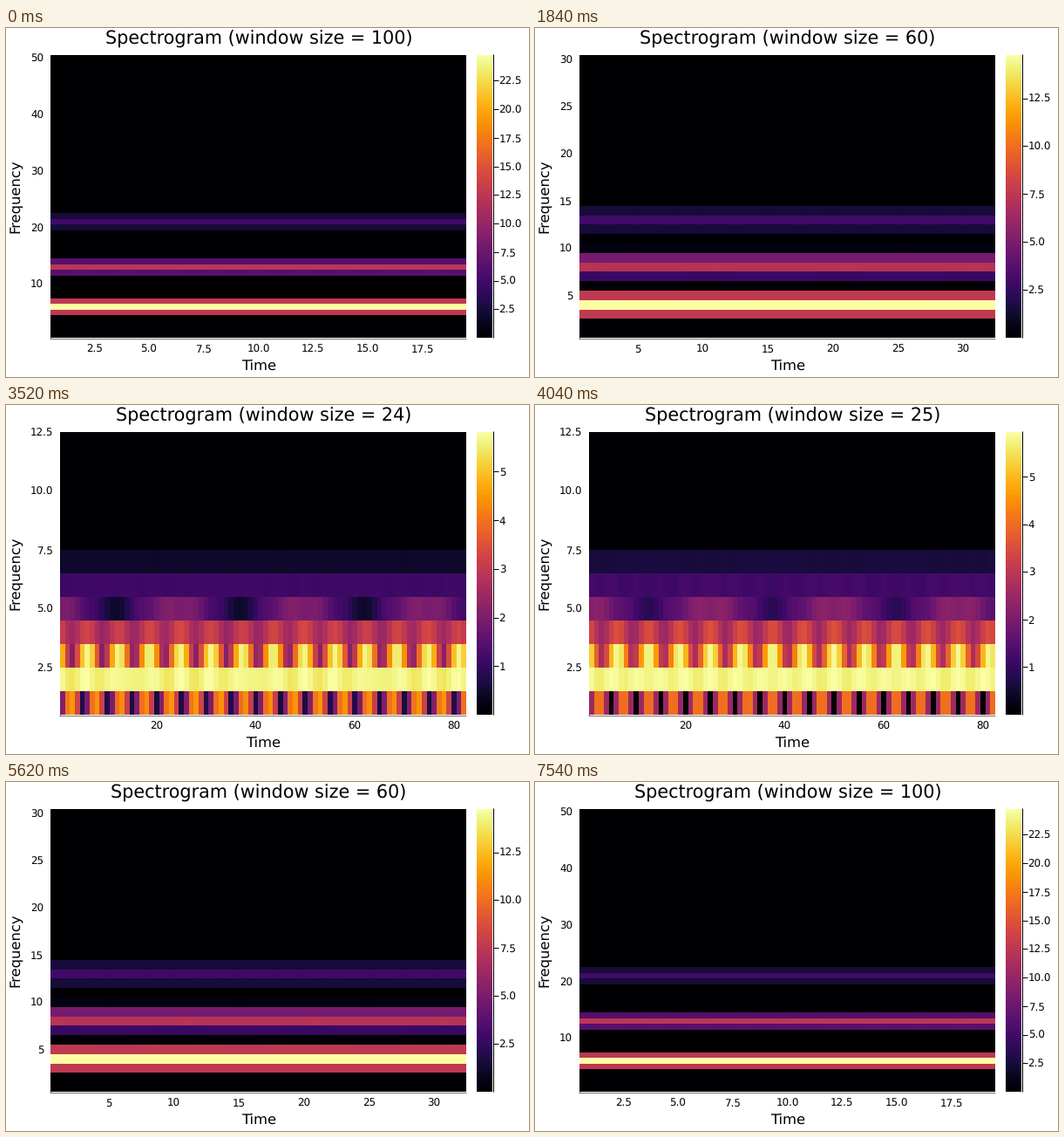
Write a matplotlib script that moves like this. It is 600 px wide and 400 px high and loops after 7640 ms.

```python
import numpy as np
import matplotlib.pyplot as plt
from matplotlib.animation import FuncAnimation
from matplotlib.collections import LineCollection

plt.rcParams["font.family"] = "DejaVu Sans"
plt.rcParams["text.hinting"] = "none"

W, H, DPI = 600, 400, 100
TOP, BOTTOM, RIGHT = 31, 355, 528
BAR_L, BAR_R = 540, 558
TICK_MS = 20
SCALE = 1.07            # text size factor
DIGIT_DROP = 4.7        # from tick position down to the label's baseline

# Signal: three sines sampled at 100 Hz for ten seconds
t = np.arange(1001) / 100
signal = sum(a * np.sin(2 * np.pi * f * t) for a, f in ((1, 5), (0.5, 12), (0.2, 20)))


def spectrogram(size):
    hop = size // 2
    starts = np.arange(0, len(signal) - size + 1, hop)
    parts = signal[starts[:, None] + np.arange(size)] * np.hanning(size)
    return np.abs(np.fft.fft(parts, axis=1))[:, :hop].T


def axis_step(count):
    """Best tick step for an axis from 0.5 to count + 0.5."""
    best = (-1, 0)
    for power in (1, 10):
        for q, nice in ((1, 1), (5, 0.9), (2, 0.7), (2.5, 0.5), (3, 0.2)):
            step = q * power
            n = int((count + 0.5) // step)
            if 4 <= n <= 8:
                score = -abs(n - 5) / 20 + 0.5 * count / ((n - 1) * step) + nice / 4
                best = max(best, (round(score, 9), step))
    return best[1]


def bar_step(span):
    power = 10.0 ** np.floor(np.log10(span))
    factor = span / power
    unit = 2 if factor > 5 else 1 if factor > 2.5 else 0.5 if factor > 1 else 0.2
    return unit * power / 2


def tick_values(step, lo, hi):
    first = int(np.ceil(lo / step))
    return [i * step for i in range(first, int(hi / step + 1e-9) + 1)]


def fmt(value, step):
    return f"{value:.1f}" if step % 1 else f"{value:.0f}"


# Window sizes go down and back up; every third picture is held longer
sizes = list(range(100, 19, -1)) + list(range(20, 101))
schedule = []
for i, size in enumerate(sizes):
    held = i % 3 == 1 or i == len(sizes) - 1
    schedule += [size] * (5 if held else 1)
spectra = {size: spectrogram(size) for size in set(sizes)}

fig = plt.figure(figsize=(W / DPI, H / DPI), dpi=DPI, facecolor="white")
ax = fig.add_axes([0, 0, 1, 1])
ax.axis("off")

heat = ax.imshow(spectra[100], cmap="inferno", origin="lower", aspect="auto",
                 interpolation="nearest", extent=(51, RIGHT, BOTTOM, TOP), zorder=2)
ax.imshow(np.linspace(0, 1, 256)[:, None], cmap="inferno", origin="lower", aspect="auto",
          interpolation="nearest", extent=(BAR_L, BAR_R, BOTTOM, TOP), zorder=2)
ax.set_xlim(0, W)
ax.set_ylim(H, 0)

spines = ax.add_collection(LineCollection([], colors="0.45", linewidths=0.72, zorder=1))
bar_lines = ax.add_collection(LineCollection([], colors="black", linewidths=0.72, zorder=3))


def label(x, y, text="", size=8, ha="center", **kw):
    return ax.text(x, y, text, fontsize=size * SCALE, ha=ha, va="baseline", **kw)


title = label(290, 18.2, size=14)
x_name = label(290, 392, "Time", size=11)
label(16, 193, "Frequency", size=11, rotation=90, rotation_mode="anchor")
x_labels = [label(0, 371.7) for _ in range(10)]
y_labels = [label(0, 0, ha="right") for _ in range(10)]
bar_labels = [label(565.6, 0, ha="left") for _ in range(12)]


def place(pool, values, step, position):
    for i, item in enumerate(pool):
        if i < len(values):
            item.set_text(fmt(values[i], step))
            item.set_position(position(values[i]))
        else:
            item.set_text("")


def update(frame):
    size = schedule[frame]
    data = spectra[size]
    rows, cols = data.shape
    low, high = data.min(), data.max()
    x_step, y_step, z_step = axis_step(cols), axis_step(rows), bar_step(high - low)
    left = 62 if y_step % 1 else 51

    heat.set_data(data)
    heat.set_clim(low, high)
    heat.set_extent((left, RIGHT, BOTTOM, TOP))

    middle = (left + RIGHT) / 2 + 0.3
    title.set_text(f"Spectrogram (window size = {size})")
    title.set_x(middle)
    x_name.set_x(middle)

    def y_pos(v):
        return BOTTOM - (v - 0.5) / rows * (BOTTOM - TOP)

    def z_pos(v):
        return BOTTOM - (v - low) / (high - low) * (BOTTOM - TOP)

    z_ticks = tick_values(z_step, low, high)
    place(x_labels, tick_values(x_step, 0.5, cols + 0.5), x_step,
          lambda v: (left + (v - 0.5) / cols * (RIGHT - left), 371.7))
    place(y_labels, tick_values(y_step, 0.5, rows + 0.5), y_step,
          lambda v: (left - 7.7, y_pos(v) + DIGIT_DROP))
    place(bar_labels, z_ticks, z_step, lambda v: (565.6, z_pos(v) + DIGIT_DROP))

    spines.set_segments([[(left - 0.5, TOP), (left - 0.5, BOTTOM + 1)],
                         [(left - 1, BOTTOM + 0.5), (RIGHT, BOTTOM + 0.5)]])
    bar_lines.set_segments([[(558.5, TOP - 1), (558.5, BOTTOM)]]
                           + [[(558.5, z_pos(v)), (565, z_pos(v))] for v in z_ticks])
    return []


anim = FuncAnimation(fig, update, frames=len(schedule), interval=TICK_MS,
                     init_func=lambda: update(0), repeat=True, repeat_delay=0, blit=False)
plt.show()
```
